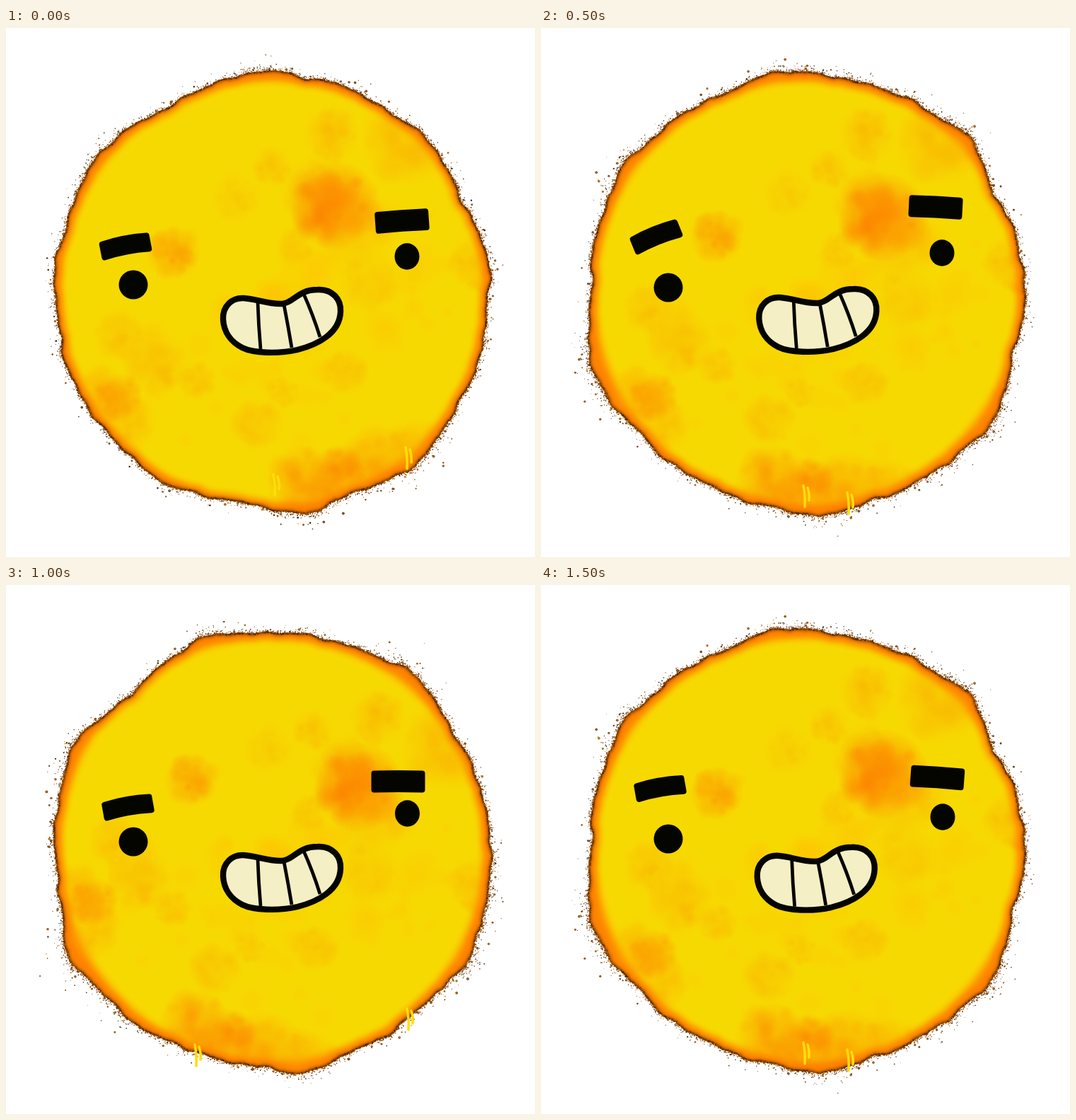
An HTML page with a canvas that plays this animation: 748x748 px, repeating every 2 s.

```html
<!DOCTYPE html>
<html lang="en">
<head>
<meta charset="utf-8">
<title>Wobbling cheese face</title>
<style>
html, body { margin: 0; width: 100%; height: 100%; overflow: hidden; background: #fff; }
canvas { display: block; }
</style>
</head>
<body>
<canvas id="stage" width="748" height="748"></canvas>
<script>
const SIZE = 748, CX = 376, CY = 374, RADIUS = 307.5, HOLD = 500, TAU = Math.PI * 2;
const stage = document.getElementById('stage').getContext('2d');
const rad = deg => deg * Math.PI / 180;

// Each scorch layer turns by its own angle from body to body; marks are [x, y, radius, strength].
const scorches = [
  { turns: [0, 10, 19], mottled: true, marks: [
    [465,250,46,1], [430,230,34,.3], [500,285,40,.35], [376,195,22,.4], [325,240,26,.25],
    [408,308,20,.35], [236,318,28,.65], [160,435,28,.4], [212,472,34,.5], [268,498,22,.35],
    [355,560,28,.4], [390,515,18,.3], [480,487,25,.4], [515,360,32,.3]] },
  { turns: [0, 0, 18], marks: [
    [460,150,30,.5], [560,165,44,.5], [664,332,30,.45], [158,523,26,.75], [130,520,32,.6], [172,562,30,.5]] },
  { turns: [0, 20, 33], marks: [[470,630,30,.8], [420,642,38,.65], [525,622,44,.65], [578,592,30,.6]] }
];

// Bumps on the rim are [degrees clockwise from the right, height].
const bodies = [
  { bumps: [[48,11], [81,8], [98,-8], [215,6], [245,-6], [268,7], [333,-8]], drips: [[379,631], [566,593]] },
  { bumps: [[36,13], [52,6], [84,10], [149,9], [162,13], [213,10], [266,7], [315,12], [330,-8]],
    drips: [[372,647], [434,657]] },
  { bumps: [[9,7], [30,12], [80,11], [134,9], [152,17], [205,11], [227,-11], [255,6], [307,13]],
    drips: [[268,650], [568,599]] }
].map(paintBody);

// Brows are [centre x, centre y, tilt in degrees].
const poses = [
  { body: 0, brows: [[169,309,-11], [560,273,-4]], eyes: [[180,363], [567,323]], mouth: [0,0] },
  { body: 1, brows: [[163,295.5,-22], [558,253.5,3]], eyes: [[180,367], [567,318]], mouth: [1.3,-1] },
  { body: 2, brows: [[172.5,314.5,-10], [554.5,278,0]], eyes: [[180,363], [567.5,323]], mouth: [0,0] },
  { body: 1, brows: [[168.5,288,-10], [560.5,272.5,4]], eyes: [[180,359], [568,328]], mouth: [-1.3,.8] }
];

function randomFrom(seed) {
  return () => {
    seed = (seed + 0x6D2B79F5) | 0;
    let t = Math.imul(seed ^ (seed >>> 15), 1 | seed);
    t = (t + Math.imul(t ^ (t >>> 7), 61 | t)) ^ t;
    return ((t ^ (t >>> 14)) >>> 0) / 4294967296;
  };
}

// Sum of the bumps near an angle.
function swell(bumps, angle) {
  return bumps.reduce((sum, [deg, height]) =>
    sum + height * Math.exp((Math.cos(angle - rad(deg)) - 1) * 90), 0);
}

function rimRadius(bumps, rnd) {
  const waves = [11, 17, 26, 39, 58].map(k => [k, rnd() * TAU, 5 / Math.sqrt(k)]);
  return angle => waves.reduce((r, [k, phase, size]) =>
    r + size * Math.sin(k * angle + phase), RADIUS + swell(bumps, angle));
}

function softDot(c, x, y, r, color, alpha) {
  const g = c.createRadialGradient(x, y, 0, x, y, r);
  g.addColorStop(0, `rgba(${color},${alpha})`);
  g.addColorStop(.5, `rgba(${color},${alpha * .6})`);
  g.addColorStop(1, `rgba(${color},0)`);
  c.fillStyle = g;
  c.fillRect(x - r, y - r, 2 * r, 2 * r);
}

function dot(c, x, y, r, color) {
  c.fillStyle = color;
  c.beginPath();
  c.arc(x, y, r, 0, TAU);
  c.fill();
}

function paintMark(c, [x, y, r, strength], rnd) {
  const color = strength === 1 ? '255,108,0' : strength > .6 ? '255,130,0' : '253,165,0';
  softDot(c, x, y, r * 1.4, color, strength * .65);
  for (let i = 0; i < 26; i++) {
    const a = rnd() * TAU, d = Math.sqrt(rnd()) * r * 1.15;
    softDot(c, x + Math.cos(a) * d, y + Math.sin(a) * d, r * (.2 + rnd() * .4), color, strength * .22);
  }
}

function paintScorch(c, { turns, mottled, marks }, index) {
  const rnd = randomFrom(5);
  c.save();
  c.translate(CX, CY);
  c.rotate(rad(turns[index]));
  c.translate(-CX, -CY);
  for (let i = 0; mottled && i < 90; i++) {
    const a = -1 + rnd() * 4, d = rnd() * 250;
    softDot(c, CX + Math.cos(a) * d, CY + Math.sin(a) * d, 10 + rnd() * 22, '255,195,0', .25);
  }
  marks.forEach(mark => paintMark(c, mark, rnd));
  c.restore();
}

function paintSpecks(c, radius, bumps, rnd) {
  const colors = ['#3c1e00', '#5c3000', '#7a3e00', '#a85a08'];
  for (let i = 0; i < 6500; i++) {
    const angle = rnd() * TAU;
    const heat = Math.max(0, swell(bumps, angle)) / 12;
    const far = rnd() < .03 + heat * .03;
    const d = far ? 3 + rnd() * rnd() * (18 + 22 * heat)
      : -Math.log(1 - rnd()) * (1.7 + 1.5 * heat) - 2;
    const r = far && rnd() < .3 ? 1 + rnd() * .9 : .4 + rnd() * .5;
    const x = CX + Math.cos(angle) * (radius(angle) + d);
    const y = CY + Math.sin(angle) * (radius(angle) + d);
    dot(c, x, y, r, colors[Math.floor(rnd() * colors.length)]);
    if (r > 1.3) dot(c, x, y, r * .55, '#c97812');
  }
}

function paintDrip(c, x, y) {
  c.strokeStyle = '#ffdd08';
  c.lineCap = 'round';
  c.lineWidth = 3.5;
  for (const [dx, dy, length] of [[0, 0, 30], [6, 3, 18]]) {
    c.beginPath();
    c.moveTo(x + dx - 1, y + dy);
    c.quadraticCurveTo(x + dx + 2, y + dy + length / 2, x + dx + 1, y + dy + length);
    c.stroke();
  }
}

function paintBody({ bumps, drips }, index) {
  const layer = document.createElement('canvas');
  layer.width = layer.height = SIZE;
  const c = layer.getContext('2d'), rnd = randomFrom(11 + index);
  const radius = rimRadius(bumps, rnd), shape = new Path2D();
  for (let deg = 0; deg < 360; deg += .4) {
    const r = radius(rad(deg)) + (rnd() - .5) * 2;
    shape.lineTo(CX + Math.cos(rad(deg)) * r, CY + Math.sin(rad(deg)) * r);
  }
  shape.closePath();

  const softStroke = (color, width, blur) => {
    c.filter = `blur(${blur}px)`;
    c.strokeStyle = color;
    c.lineWidth = width;
    c.stroke(shape);
    c.filter = 'none';
  };

  c.save();
  c.clip(shape);
  c.fillStyle = '#ff8800';
  c.fillRect(0, 0, SIZE, SIZE);
  c.filter = 'blur(6px)';
  dot(c, CX, CY, 300, '#f7d902');
  c.filter = 'none';
  scorches.forEach(scorch => paintScorch(c, scorch, index));
  softStroke('rgba(255,125,0,.85)', 18, 5);
  softStroke('rgba(105,55,0,.85)', 5, 2);
  c.restore();
  paintSpecks(c, radius, bumps, rnd);
  drips.forEach(([x, y]) => paintDrip(c, x, y));
  return layer;
}

function drawBrow([x, y, tilt], width, height, bow) {
  const corner = 4, w = width / 2 - corner, h = height / 2 - corner;
  stage.save();
  stage.translate(x, y);
  stage.rotate(rad(tilt));
  stage.beginPath();
  stage.moveTo(-w, -h);
  stage.quadraticCurveTo(0, -h - bow, w, -h);
  stage.lineTo(w, h);
  stage.quadraticCurveTo(0, h - bow, -w, h);
  stage.closePath();
  stage.lineWidth = corner * 2;
  stage.fill();
  stage.stroke();
  stage.restore();
}

function drawEye([x, y], rx, ry) {
  stage.beginPath();
  stage.ellipse(x, y, rx, ry, 0, 0, TAU);
  stage.fill();
}

const lips = new Path2D('M307 412C306 393 320 381 336 382C355 383 370 391 391 390' +
  'C408 388 412 370 441 370C462 369 474 384 473 401C472 432 440 448 412 455' +
  'C385 461 350 460 334 452C318 444 308 430 307 412Z');
const gaps = new Path2D('M356 388Q357 420 360 454M393 391Q399 422 404 452M420 374Q434 405 444 437');

function drawMouth([dx, dy]) {
  stage.save();
  stage.translate(dx, dy);
  stage.fillStyle = '#f5efc5';
  stage.fill(lips);
  stage.lineWidth = 4.8;
  stage.stroke(gaps);
  stage.lineWidth = 8.4;
  stage.stroke(lips);
  stage.restore();
}

function draw(now) {
  const pose = poses[Math.floor(now / HOLD) % poses.length];
  stage.fillStyle = '#fff';
  stage.fillRect(0, 0, SIZE, SIZE);
  stage.drawImage(bodies[pose.body], 0, 0);
  stage.fillStyle = stage.strokeStyle = '#050500';
  stage.lineJoin = 'round';
  drawBrow(pose.brows[0], 72, 27, 4);
  drawBrow(pose.brows[1], 76, 31, 1);
  drawEye(pose.eyes[0], 20.5, 20.5);
  drawEye(pose.eyes[1], 17.5, 18.7);
  drawMouth(pose.mouth);
}

const start = performance.now();
function tick() {
  draw(performance.now() - start);
  requestAnimationFrame(tick);
}
tick();
</script>
</body>
</html>
```
